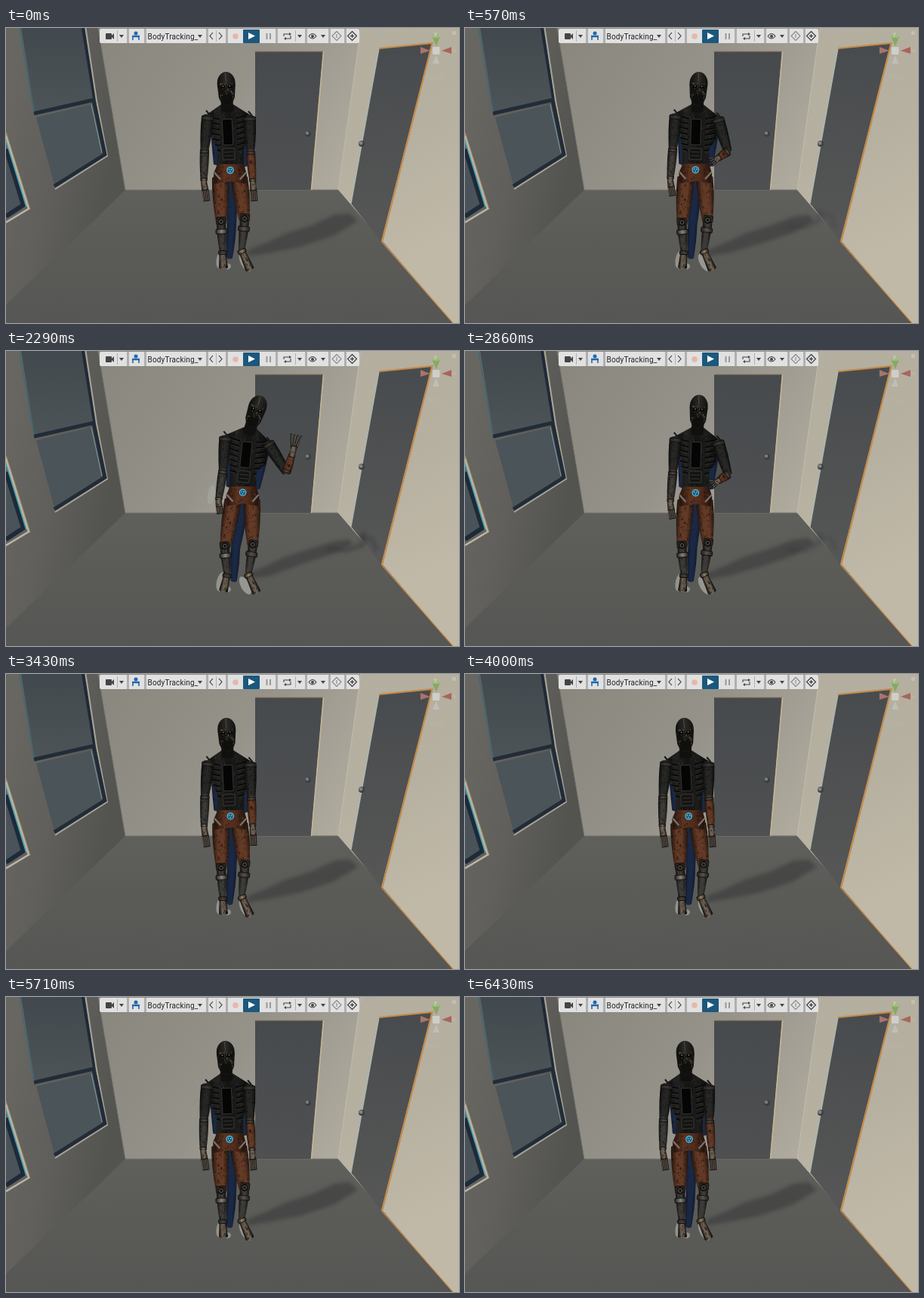
An HTML page with a canvas that plays this animation: 600 px wide and 390 px high, repeating every 6.57 s.

```html
<!DOCTYPE html>
<html lang="en">
<head>
<meta charset="utf-8">
<title>Body tracking viewport</title>
<style>
html, body { margin: 0; width: 100%; height: 100%; overflow: hidden; background: #555; }
canvas { display: block; }
</style>
</head>
<body>
<canvas id="stage" width="600" height="390"></canvas>
<script>
const c = document.getElementById('stage').getContext('2d');
const LOOP = 6570, STEP = LOOP / 46;
let seed = 1;
const rnd = () => (seed = (seed * 16807) % 2147483647) / 2147483647;
const mix = (a, b, k) => a + (b - a) * k;
const add = ([x, y], dx, dy) => [x + dx, y + dy];
const between = (p, q, k) => [mix(p[0], q[0], k), mix(p[1], q[1], k)];
function ease(from, to, t) {
  const k = Math.max(0, Math.min(1, (t - from) / (to - from)));
  return k * k * (3 - 2 * k);
}

// ---------- drawing helpers ----------
function trace(pts, close = true) {
  c.beginPath();
  for (let i = 0; i < pts.length; i += 2) c.lineTo(pts[i], pts[i + 1]);
  if (close) c.closePath();
}
function poly(fill, ...pts) { trace(pts); c.fillStyle = fill; c.fill(); }
function line(color, width, ...pts) {
  trace(pts, false);
  c.strokeStyle = color; c.lineWidth = width; c.stroke();
}
function oval(color, x, y, rx, ry = rx, turn = 0) {
  c.beginPath(); c.ellipse(x, y, rx, ry, turn, 0, 7);
  c.fillStyle = color; c.fill();
}
function ring(color, width, x, y, r) {
  c.beginPath(); c.arc(x, y, r, 0, 7);
  c.strokeStyle = color; c.lineWidth = width; c.stroke();
}
function box(color, x, y, w, h, r = 0) {
  c.beginPath(); c.roundRect(x, y, w, h, r);
  c.fillStyle = color; c.fill();
}
function ramp(x0, y0, x1, y1, ...colors) {
  const g = c.createLinearGradient(x0, y0, x1, y1);
  colors.forEach((col, i) => g.addColorStop(i / (colors.length - 1), col));
  return g;
}
function text(str, x, y, size, color) {
  c.font = `${size}px Roboto, sans-serif`;
  c.fillStyle = color; c.fillText(str, x, y);
}

// ---------- room ----------
function room() {
  poly(ramp(130, 20, 440, 214, '#89877e', '#95928a', '#b0ab9e'), 122, 0, 470, 0, 440, 214, 158, 214);
  poly(ramp(0, 214, 0, 390, '#5f5f5c', '#5a5a57', '#565654'), 158, 214, 440, 214, 592, 390, 0, 390, 0, 366);
  poly(ramp(0, 100, 150, 130, '#676661', '#605f5b', '#53534f'), 0, 0, 122, 0, 158, 214, 0, 366);
  poly(ramp(450, 0, 590, 280, '#b3ae9f', '#b6b0a0', '#c0b9a8'), 470, 0, 600, 0, 600, 390, 592, 390, 440, 214);
  line('#77766f', 1, 122, 0, 158, 214, 440, 214);
  line('#c2bbaa', 1, 470, 0, 440, 214);

  // tall window and the edge of its neighbour
  poly(ramp(0, 0, 0, 110, '#41494e', '#4c5457'), 20, 0, 103, 0, 117, 93, 38, 112);
  poly('#4b5458', 40, 118, 114, 101, 128, 165, 64, 207);
  line('#1f2a38', 4, 102, 0, 117, 93);
  line('#a8a597', 2, 105.5, 0, 120, 96, 134, 169, 65, 213);
  line('#222c38', 5, 37, 113, 116, 95, 131, 167, 64, 209);
  line('#356a7c', 1.2, 18, 0, 37, 111);
  line('#7f9da0', 1, 113, 101, 127, 165);
  poly('#495359', 0, 160, 24, 234, 0, 248);
  line('#1e2a38', 6, 0, 160, 23, 234, 0, 249);
  line('#4aa2b6', 2, 0, 148, 27, 236);
  line('#b9b6a6', 2.5, 0, 142, 30, 239, 0, 257);
  line('#b29469', 1, 0, 138, 32, 240);

  // doors
  poly(ramp(330, 30, 330, 214, '#474a4d', '#4e5051'), 330, 31, 420, 31, 404, 214, 330, 214);
  line('#94795b', 1.2, 330, 31, 420, 31);
  line('#c6b495', 1.6, 420.5, 31, 404.5, 214);
  oval('#3b3e41', 400, 140, 3.8); oval('#777a7b', 399, 139, 2.3);
  poly(ramp(500, 20, 480, 260, '#484b4e', '#555655'), 494, 27, 564, 20, 497, 282, 457, 232);
  line('#a9bab4', 1.4, 457, 232, 494, 27);
  line('#c58a49', 2.2, 494, 27, 564.5, 20, 498, 283);
  line('#c98c45', 1.2, 498, 283, 592, 390);
  oval('#3d4043', 471, 153, 4); oval('#808382', 470, 152, 2.5);
}

// ---------- editor interface ----------
function arrow(x) { poly('#444', x - 3, 9, x + 3, 9, x, 13); }
function interfaceBar() {
  box('#e1e1e1', 124, 1, 344, 19, 2);
  for (const x of [160, 183, 265, 291, 357, 396, 427, 448]) box('#b0b0b0', x, 1, 3, 19);
  for (const x of [147, 278, 383]) box('#b0b0b0', x, 3, 1, 15);
  box('#444', 132, 7, 8, 8, 1); poly('#444', 140, 10, 143, 7, 143, 15, 140, 12);
  [153, 257, 389, 420].forEach(arrow);
  oval('#2368ac', 172, 7, 2.5);
  line('#2368ac', 2.5, 167, 11, 177, 11);
  line('#2368ac', 1.6, 168, 16, 168, 11, 176, 11, 176, 16);
  c.letterSpacing = '.15px';
  text('BodyTracking_', 187.5, 14.5, 10, '#222');
  c.letterSpacing = '0px';
  line('#333', 1.1, 274, 6, 270, 10.5, 274, 15);
  line('#333', 1.1, 282, 6, 286, 10.5, 282, 15);
  oval('#e7b7a8', 304, 11, 3.8);
  box('#1c587c', 314, 2, 22, 18, 1);
  poly('#fff', 321, 6, 330, 10.5, 321, 15);
  box('#999', 344.5, 7, 2, 8); box('#999', 349, 7, 2, 8);
  line('#444', 1.1, 368, 11, 368, 8, 376, 8);
  line('#444', 1.1, 377, 10, 377, 14, 370, 14);
  poly('#444', 375, 6, 378, 8, 375, 10); poly('#444', 371, 12, 368, 14, 371, 16);
  c.beginPath(); c.moveTo(401, 11); c.quadraticCurveTo(406, 4, 411, 11); c.quadraticCurveTo(406, 17, 401, 11);
  c.strokeStyle = '#444'; c.lineWidth = 1.1; c.stroke();
  oval('#444', 406, 11, 2);
  for (const [x, color] of [[438, '#888'], [458.5, '#333']]) {
    line(color, 1.1, x, 4.5, x + 6, 10.5, x, 16.5, x - 6, 10.5, x, 4.5);
    line(color, 1.1, x, 8, x, 13);
  }
  line('#333', 1.2, 456, 10.5, 461, 10.5);

  // view gizmo
  poly('#86a962', 564, 11, 575, 11, 570, 24); oval('#9fbd7c', 569.5, 11, 5.5, 2);
  poly('#a9746b', 549, 25, 549, 34, 562, 30);
  poly('#a9655a', 590, 25, 590, 34, 577, 30);
  poly('#bfbfb9', 565, 47, 574, 47, 570, 36);
  box('#cfcec8', 565, 25, 9.5, 10, 1);
  text('y', 567, 10, 8, '#d5dfc8'); text('x', 592, 32, 8, '#d0bab2');
  text('<Persp', 552, 68, 9, '#c8c4b840');
  box('#d0cdc488', 591, 4, 5, 5, 1);
}

// ---------- motion ----------
// 0 = arms down, 1 = leaning with the hand up
const raisedAt = t => ease(0, 1160, t) * (1 - ease(2150, 3550, t));

function poseAt(t) {
  const u = raisedAt(t), bend = Math.sin(Math.PI * u);
  const idle = -1.8 * Math.sin(Math.PI * ease(3200, LOOP, t));
  const swing = 4 * u ** 4 * Math.sin((t - 1570) / 95);
  const p = { u };
  p.hub = [297 + 17 * u + idle, 188 - u];
  p.neck = add(p.hub, -4 + 13 * u, -82 + u);
  p.head = add(p.neck, -1 + 10 * u * u, -25);

  p.shL = add(p.neck, -26 - 6 * u, 11 - 3 * u);
  p.elL = add(p.shL, -4 + u, 44);
  p.wrL = add(p.elL, -1 - 5 * u, 42 - 2 * u);
  p.hdL = add(p.wrL, 4 - 2 * u, 26 - 9 * u);

  const lift = .02 + .55 * u;
  p.shR = add(p.neck, 30 - 5 * u, 12 + 4 * u);
  p.elR = add(p.shR, 45 * Math.sin(lift), 45 * Math.cos(lift));
  p.wrR = add(p.elR, 3 + 5 * u - 18 * bend + swing / 2, mix(41, -25, u));
  p.hdR = add(p.wrR, 2 + 3 * u - 14 * bend + swing / 2, mix(25, -28, u) + 7 * bend);

  p.hipL = add(p.hub, -13, 10);
  p.knL = [285 + 5 * u, 260 + 2 * u];
  p.anL = [287 + 6 * u, 296];
  p.toL = [288, 317];
  p.hipR = add(p.hub, 12, 10);
  p.knR = [316 + 11 * u, 256 + 4 * u];
  p.anR = [312 + 9 * u, 294 + u];
  p.toR = [323 + 9 * u, 319];
  return p;
}

// ---------- body ----------
const BLACK = ['#0c0c0b', '#272725'], RUST = ['#20140e', '#633a26'], STEEL = ['#121211', '#3d3b37'],
  SKIN = ['#1d1815', '#6d6154'], NAVY = ['#121a2d', '#1b2843'];

// Runs draw() with the y axis along p -> q and passes the length.
function along(p, q, draw) {
  const dx = q[0] - p[0], dy = q[1] - p[1];
  c.save();
  c.translate(...p); c.rotate(Math.atan2(dy, dx) - Math.PI / 2);
  draw(Math.hypot(dx, dy));
  c.restore();
}
function grit(n, x, y, w, h, colors) {
  for (let i = 0; i < n; i++) {
    c.globalAlpha = .2 + rnd() * .45;
    box(colors[Math.floor(rnd() * colors.length)], x + rnd() * w, y + rnd() * h, .6 + rnd() * 1.2, .8 + rnd() * 3);
  }
  c.globalAlpha = 1;
}
function limb(p, q, w0, w1, [dark, light], n = 30) {
  along(p, q, len => {
    c.beginPath();
    c.moveTo(-w0, 0); c.quadraticCurveTo(0, -w0 * .8, w0, 0);
    c.quadraticCurveTo(w0 * 1.1, len * .4, w1, len);
    c.quadraticCurveTo(0, len + w1 * .7, -w1, len);
    c.quadraticCurveTo(-w0 * 1.1, len * .4, -w0, 0);
    c.clip();
    box(ramp(-w0, 0, w0, 0, dark, light, light, dark), -20, -10, 40, len + 20);
    grit(n, -w0, 0, w0 * 2, len, [dark, '#0b0a09', light]);
  });
}
function band(p, q, at, w, h, color) {
  along(p, q, len => {
    box('#11100f', -w - .5, len * at - h / 2 - 1, 2 * w + 1, h + 2, 2);
    box(ramp(-w, 0, w, 0, '#22201e', color, '#242220'), -w, len * at - h / 2, 2 * w, h, 2);
  });
}
function hand(wrist, tip, spread) {
  limb(wrist, between(wrist, tip, .5), 4, 4.5, SKIN, 10);
  along(wrist, tip, len => {
    for (let s = -1.5; s < 2; s++) {
      line('#171412', 2.4, s * 2.2, len * .4, s * (2.2 + spread), len);
      line(SKIN[1], 1, s * 2.2 - .4, len * .45, s * (2.2 + spread) - .4, len - 1);
    }
  });
}
function leg(p, side, cup, cuff) {
  const [hip, knee, ankle, toe] = ['hip', 'kn', 'an', 'to'].map(j => p[j + side]);
  limb(hip, knee, 11, 6.5, RUST, 90);
  limb(knee, ankle, 6, 4, STEEL, 30);
  band(knee, ankle, -.15, 6, 8, '#33302c');
  band(knee, ankle, .25, 7.5, 5, cup);
  oval('#100f0e', knee[0], knee[1] - 4, 4, 5); ring('#7b756a', .8, knee[0], knee[1] - 4, 2.4);
  limb(ankle, toe, 4.5, 6, SKIN, 35);
  band(ankle, toe, .05, 5.5, 4, cuff);
}
function torso({ shL, shR, neck, hub }) {
  c.save();
  trace([shL[0] - 2, shL[1] - 2, neck[0] - 8, neck[1] - 5, neck[0] + 8, neck[1] - 5, shR[0] + 2, shR[1] - 2,
    shR[0] - 3, shR[1] + 28, hub[0] + 18, hub[1] - 28, hub[0] + 18, hub[1] - 5,
    hub[0] - 18, hub[1] - 5, hub[0] - 17, hub[1] - 28, shL[0] + 6, shL[1] + 28]);
  c.clip();
  box(ramp(shL[0], 0, shR[0], 0, '#0f0f0f', '#212120', '#141413', '#1c1c1b', '#0a0a0a'), 240, 95, 140, 100);
  along(neck, hub, len => {
    grit(180, -28, 0, 56, len, ['#050505', '#33322f', '#0d0d0c', '#3d3b37']);
    for (let y = 14; y < 60; y += 7) for (const s of [-1, 1]) {
      line('#070707', 1.5, s * 25, y - 3, s * 11, y);
      line('#33322f', .6, s * 24, y - 1, s * 12, y + 2);
    }
    box('#353431', -8, 14, 14, 35, 2); box('#050505', -7, 15, 12, 33, 1);
    box('#2a2927', -10, 52, 18, 17, 3); box('#131312', -8, 54, 14, 13, 2);
    for (const y of [58, 63]) line('#403e3a', .8, -7, y, 5, y);
  });
  c.restore();
}
function pelvis([x, y]) {
  c.save();
  trace([x - 17, y - 8, x + 18, y - 8, x + 22, y + 6, x + 19, y + 18, x + 3, y + 15, x - 2, y + 15, x - 21, y + 18, x - 22, y + 4]);
  c.clip();
  box(ramp(x - 22, 0, x + 22, 0, '#23130d', '#5c3320', '#4e2b1b', '#1e110c'), x - 25, y - 10, 50, 32);
  grit(60, x - 22, y - 8, 44, 26, ['#1b100b', '#7a4528', '#140f0d']);
  c.restore();
  for (const s of [-1, 1]) line('#77716a', 2.4, x + s * 21, y + 3, x + s * 13, y + 12);
}
function head({ head, neck }) {
  along(neck, head, () => box('#10100f', -8, -5, 16, 18, 3));
  along(head, neck, () => {
    oval(ramp(-12, 0, 12, 0, '#10100f', '#2c2a26', '#111110'), 0, -8, 12, 15);
    poly('#141311', -12, -6, 12, -6, 10.5, 11, 6, 21, 0, 23, -6, 21, -10.5, 11);
    line('#57534a', .8, -1, -22, 0, -10);
    grit(60, -9, -10, 17, 20, ['#8b8373', '#090908', '#4a453d', '#5f584c']);
    for (const s of [-1, 1]) { oval('#060606', s * 4.5, -3, 3, 2); oval('#a39b8c', s * 4.5, -4, .8); }
    poly('#0f0f0e', -8, 9, 0, 7, 8, 9, 4, 20, -4, 20);
  });
}
function marker([x, y]) {
  oval('#175b7c', x, y, 5); ring('#66b7d1', 1.2, x, y, 4.2);
  for (let a = -.5; a < 5; a += 2.1) oval('#99d9e8', x + 1.8 * Math.cos(a), y + 1.8 * Math.sin(a), .8);
}

function shadow(u) {
  c.save();
  c.filter = 'blur(2.5px)'; c.globalAlpha = .5;
  const thin = u * 7;
  poly('#323435', 320, 302, 350, 297, 390, 289 - thin, 435, 274 - thin, 466 - thin, 255, 455, 245 + u * 4,
    435, 247 + u * 5, 405, 261, 370, 272, 345, 284, 320, 294);
  c.globalAlpha = .45 * u;
  line('#303335', 6, 425, 262, 452, 263, 465 + 9 * u, 252 + 4 * u, 466 + 7 * u, 239);
  line('#303335', 4, 470, 246, 485, 248, 491, 264);
  c.restore();
}

// second body seen behind the first
function ghost(p) {
  oval('#93938d', 285, 305, 6, 13, .25);
  oval('#979791', 317, 310, 6, 13, -.5);
  oval('#8f908b', 293, 315, 5, 4);
  c.globalAlpha = p.u * .7; oval('#a5a59f', 272, 190, 5, 13, .15); c.globalAlpha = 1;
  limb(add(p.hipL, 14, 0), add(p.knL, 14, 0), 8, 6, NAVY, 8);
  limb(add(p.knL, 14, 0), add(p.anL, 9, 8), 6, 4, NAVY, 4);
  limb(add(p.shR, -4, 0), add(p.hub, 18, -6), 7, 5, NAVY, 8);
  limb(add(p.shL, 8, 0), add(p.hub, -18, -8), 5, 4, NAVY, 8);
  limb(add(p.shR, -2, 4), between(p.shR, p.elR, .75), 6, 4, NAVY, 5);
}

function arm(p, side, tone, spread) {
  const [sh, el, wr, hd] = ['sh', 'el', 'wr', 'hd'].map(j => p[j + side]);
  limb(sh, el, 7.8, 5.5, BLACK, 45);
  band(sh, el, .05, 7.5, 4, '#383632');
  line('#191817', 2, sh[0] - 2, sh[1] - 8, sh[0] + 3, sh[1] - 2);
  limb(el, wr, 6, 4.2, tone, 40);
  band(el, wr, .05, 5.5, 3, '#4d4841');
  band(el, wr, .93, 4.2, 2.5, '#716a5e');
  hand(wr, hd, spread);
}

function figure(p) {
  ghost(p);
  leg(p, 'R', '#57514a', '#93805f');
  leg(p, 'L', '#88837a', '#474039');
  torso(p);
  pelvis(p.hub);
  arm(p, 'L', STEEL, 0);
  arm(p, 'R', RUST, p.u * 2.6);
  head(p);
  marker(p.hub);
}

// ---------- loop ----------
let shown = -1;
function tick(now) {
  const step = Math.floor((now % LOOP + 6) / STEP) % 46;
  if (step !== shown) {
    shown = step;
    seed = 4711;
    const p = poseAt(step * STEP);
    room();
    shadow(p.u);
    figure(p);
    interfaceBar();
  }
  requestAnimationFrame(tick);
}
tick(0);
</script>
</body>
</html>
```
